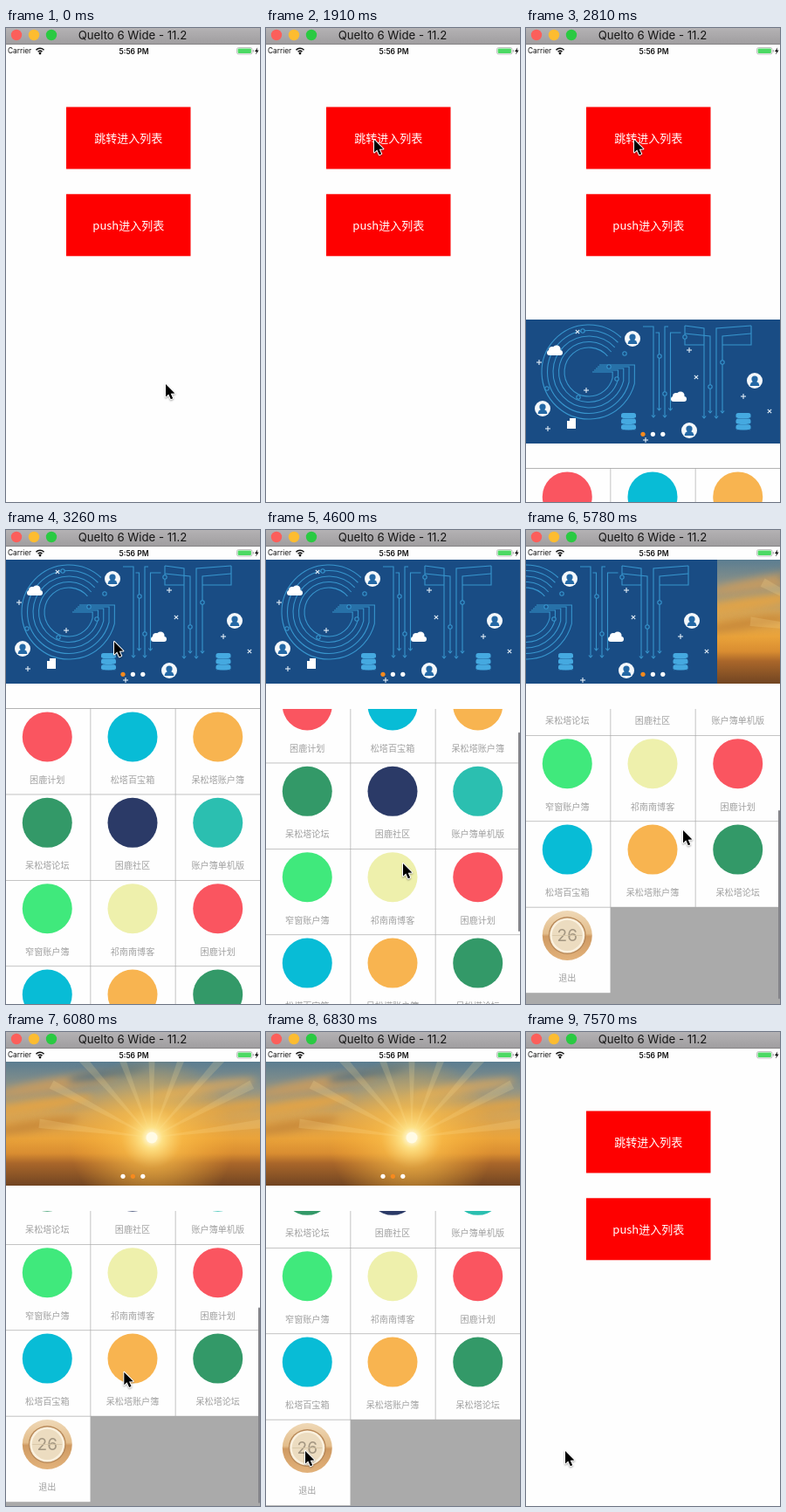
Animation of 291 by 543 pixels, one loop 8 s. Source, as an HTML page with a canvas:

```html
<!DOCTYPE html>
<html lang="zh">
<head>
<meta charset="utf-8">
<style>
html, body { margin: 0; width: 100%; height: 100%; overflow: hidden; background: #fefefe; }
canvas { display: block; width: 291px; height: 543px; }
</style>
</head>
<body>
<canvas id="stage"></canvas>
<script>
const W = 291, H = 543, LOOP = 8000, TICK = 148.4, TAU = Math.PI * 2;
const GRID_Y = 205, PITCH = 98.4, GAP = 0.7, CELL_W = (W - 2 * GAP) / 3;
const BANNER_Y = 34, BANNER_H = 142;
const CJK = '"Noto Sans CJK SC", "Noto Sans CJK", "Noto Sans", sans-serif';
const UI = 'Inter, Roboto, sans-serif';

const canvas = document.getElementById('stage');
const dpr = window.devicePixelRatio || 1;
canvas.width = W * dpr;
canvas.height = H * dpr;
const g = canvas.getContext('2d');

const apps = [
  ['困鹿计划', '#fa5560'], ['松塔百宝箱', '#08bcd6'], ['呆松塔账户簿', '#f8b450'],
  ['呆松塔论坛', '#339968'], ['困鹿社区', '#2b3a67'], ['账户簿单机版', '#2bbfb0'],
  ['窄窗账户簿', '#40e97c'], ['祁南南博客', '#eef0ac']
];
const cells = [0, 1, 2, 3, 4, 5, 6, 7, 0, 1, 2, 3].map(i => apps[i]).concat([['退出', null]]);

// Keys are [tick, value, ...], interpolated linearly.
const cursorKeys = [
  [0, 183, 408], [3, 203, 247], [4, 203, 247], [7, 241, 177], [8, 241, 177],
  [13, 124, 128], [24, 124, 128], [27, 157, 437], [30, 157, 437], [31, 157, 382],
  [32, 168, 355], [33, 180, 344], [39, 180, 344], [45, 46, 481], [46, 45, 480]
];
const scrollKeys = [
  [30, 0], [31, 36], [32, 74], [33, 98], [34, 116], [35, 131], [36, 143],
  [37, 153], [38, 161], [39, 166], [40, 162], [41, 158], [42, 155.5], [44, 154]
];
const sheetKeys = [[18, 521], [19, 300], [20, 95], [21, 18], [22, 0], [49, 0], [50, 310], [51, 521]];
const slideKeys = [[38, 0], [39, 72], [40, 240], [41, 291]];
const barKeys = [[30, 0], [31, 1], [41, 1], [44, 0]];

function at(keys, n) {
  let a = keys[0];
  for (const b of keys) {
    if (n <= b[0]) {
      const p = b === a ? 0 : (n - a[0]) / (b[0] - a[0]);
      return a.slice(1).map((v, i) => v + (b[i + 1] - v) * p);
    }
    a = b;
  }
  return a.slice(1);
}

function rect(x, y, w, h, color) {
  g.fillStyle = color;
  g.fillRect(x, y, w, h);
}

function disc(x, y, r, color) {
  g.fillStyle = color;
  g.beginPath();
  g.arc(x, y, r, 0, TAU);
  g.fill();
}

function pill(x, y, w, h, r, color) {
  g.fillStyle = color;
  g.beginPath();
  g.roundRect(x, y, w, h, r);
  g.fill();
}

function line(...pts) {
  g.beginPath();
  for (let i = 0; i < pts.length; i += 2) g.lineTo(pts[i], pts[i + 1]);
  g.stroke();
}

function text(str, x, y, font, color, align = 'center') {
  g.font = font;
  g.fillStyle = color;
  g.textAlign = align;
  g.textBaseline = 'middle';
  g.fillText(str, x, y);
}

function clipped(x, y, w, h, draw) {
  g.save();
  g.beginPath();
  g.rect(x, y, w, h);
  g.clip();
  draw();
  g.restore();
}

function titleBar() {
  const fill = g.createLinearGradient(0, 0, 0, 18);
  fill.addColorStop(0, '#b4b2b4');
  fill.addColorStop(1, '#a09ea0');
  rect(0, 0, W, 18, fill);
  rect(0, 18, W, 1, '#858385');
  ['#fc5f5b', '#fdbc30', '#2aca42'].forEach((c, i) => disc(12 + i * 20, 8, 6.2, c));
  text('Quelto 6 Wide - 11.2', 145, 9, '13.2px ' + UI, '#151515');
}

function statusBar() {
  text('Carrier', 2, 27, '8.3px ' + UI, '#111', 'left');
  text('5:56 PM', 146.5, 27, '600 8.5px ' + UI, '#111');
  g.strokeStyle = '#111';
  g.lineWidth = 1.5;
  for (const r of [3.3, 6.2]) {
    g.beginPath();
    g.arc(39, 29.5, r, -Math.PI * 0.76, -Math.PI * 0.24);
    g.stroke();
  }
  disc(39, 29, 1.4, '#111');
  g.strokeStyle = '#999';
  g.lineWidth = 0.6;
  g.beginPath();
  g.roundRect(264.5, 22.5, 17.5, 7.5, 2);
  g.stroke();
  pill(265.6, 23.6, 15.3, 5.3, 1, '#4cd964');
  pill(282.8, 25, 1, 2.6, 0.5, '#999');
  g.fillStyle = '#111';
  g.beginPath();
  [[288.2, 22.3], [285, 27], [287, 27], [286, 30.6], [289.6, 25.6], [287.5, 25.6]]
    .forEach(p => g.lineTo(...p));
  g.fill();
}

function home() {
  [['跳转进入列表', 90.5], ['push进入列表', 190.3]].forEach(([label, y]) => {
    rect(69, y, 142.5, 71, '#fe0000');
    text(label, 140.3, y + 35.7, '300 13px ' + CJK, '#fff');
  });
}

function avatar(x, y) {
  disc(x, y, 9, '#f4f8fb');
  disc(x, y - 2, 3.6, '#2468a5');
  g.beginPath();
  g.arc(x, y + 6, 5.4, Math.PI, 0);
  g.fill();
}

function cloud(x, y) {
  pill(x - 9, y, 18, 6, 3, '#fff');
  disc(x - 3, y, 4, '#fff');
  disc(x + 2, y - 1, 4.6, '#fff');
}

function database(x, y) {
  for (let i = 0; i < 3; i++) {
    pill(x - 8.5, y + i * 6.6, 17, 6.6, 2.6, '#45a9e0');
    g.strokeStyle = '#1a4c84';
    g.lineWidth = 0.9;
    g.beginPath();
    g.ellipse(x, y + 5 + i * 6.6, 8.5, 2, 0, 0, Math.PI);
    g.stroke();
  }
}

function arrow(x, y, dir) {
  line(x - 2.2, y - 2.5 * dir, x, y, x + 2.2, y - 2.5 * dir);
}

function circuitBanner() {
  rect(0, 0, W, H, '#194c84');
  g.strokeStyle = '#3795cd';
  g.lineWidth = 1.1;
  for (let i = 0; i < 5; i++) {
    const r = 54 - i * 6.5;
    g.beginPath();
    g.arc(72, 94, r, -0.82 + i * 0.03, 0.25, true);
    g.lineTo(72 + r * 0.97, 86 + i * 2);
    g.lineTo(84 - i * 2, 86 + i * 2);
    g.stroke();
  }
  // Stem of the I
  for (let i = 0; i < 4; i++) {
    const x = 146 + i * 6.5, y = 42 + (i % 2) * 7;
    line(x - 12 + i * 8, y, x, y, x, 146 - (i % 2) * 8);
    arrow(x, 146 - (i % 2) * 8, 1);
  }
  // T with a wide double bar
  for (let i = 0; i < 4; i++) {
    const x = 204 + i * 7, y = 41 + (i % 2) * 9;
    line(i < 2 ? 182 : 258, y, x, y + 3, x, 147 - (i % 2) * 6);
    arrow(x, 147 - (i % 2) * 6, 1);
  }
  line(182, 41, 182, 63, 204, 63);
  line(258, 41, 258, 63, 225, 63);
  [[65, 47], [24, 113], [95, 88], [104, 102], [60, 123], [113, 73], [153, 76], [159, 119], [211, 111], [225, 83], [182, 54]]
    .forEach(([x, y]) => {
      disc(x, y, 2.2, '#194c84');
      g.stroke();
    });
  [[122, 56], [19, 136], [262, 104], [187, 161]].forEach(p => avatar(...p));
  cloud(33, 69);
  cloud(175, 122);
  database(117.5, 141);
  database(249, 141);
  rect(47, 147, 10, 12, '#fff');
  rect(47, 147, 3, 3, '#194c84');
  g.strokeStyle = '#e4eff8';
  g.lineWidth = 1.1;
  [[69, 115], [15, 83], [25, 159], [137, 172], [249, 122], [187, 69]].forEach(([x, y]) => {
    line(x - 3, y, x + 3, y);
    line(x, y - 3, x, y + 3);
  });
  [[59, 48], [195, 100], [279, 139]].forEach(([x, y]) => {
    line(x - 2.2, y - 2.2, x + 2.2, y + 2.2);
    line(x - 2.2, y + 2.2, x + 2.2, y - 2.2);
  });
}

function sunsetBanner() {
  const sky = g.createLinearGradient(0, BANNER_Y, 0, BANNER_Y + BANNER_H);
  [[0, '#5b7d91'], [0.22, '#8f9488'], [0.42, '#d3a458'], [0.62, '#eaa33a'], [0.74, '#d98d31'], [0.82, '#a9662a'], [1, '#714522']]
    .forEach(s => sky.addColorStop(...s));
  rect(0, BANNER_Y, W, BANNER_H, sky);
  g.save();
  g.filter = 'blur(4px)';
  [[60, 60, 70, 8, '#c29a62'], [40, 84, 60, 7, '#e0a348'], [225, 65, 62, 7, '#c7a267'], [255, 88, 50, 6, '#dba24a'], [115, 48, 45, 5, '#537183'], [30, 108, 55, 6, '#c98a3a']]
    .forEach(([x, y, rx, ry, c]) => {
      g.fillStyle = c;
      g.beginPath();
      g.ellipse(x, y, rx, ry, -0.16, 0, TAU);
      g.fill();
    });
  g.restore();
  const glow = g.createRadialGradient(167, 121, 3, 167, 121, 95);
  [[0, '#fffbe0'], [0.1, '#ffe58aee'], [0.35, '#ffc24a99'], [1, '#ffb03000']]
    .forEach(s => glow.addColorStop(...s));
  rect(0, BANNER_Y, W, BANNER_H, glow);
  g.fillStyle = '#ffe39a30';
  for (let i = 0; i < 9; i++) {
    const a = Math.PI * (1.04 + i * 0.115);
    g.beginPath();
    for (const d of [-0.04, 0.04]) g.lineTo(167 + 130 * Math.cos(a + d), 121 + 130 * Math.sin(a + d));
    g.lineTo(167, 121);
    g.fill();
  }
  disc(167, 121, 6.5, '#fffbe6');
}

function banner(slide) {
  clipped(0, BANNER_Y, W, BANNER_H, () => {
    [circuitBanner, sunsetBanner].forEach((draw, i) => {
      const x = i * W - slide;
      if (Math.abs(x) >= W) return;
      g.save();
      g.translate(x, 0);
      clipped(0, BANNER_Y, W, BANNER_H, draw);
      g.restore();
    });
  });
  const page = Math.round(slide / W);
  for (let i = 0; i < 3; i++) disc(134 + i * 11.4, 165.3, 2.6, i === page ? '#f78a1d' : '#fff');
}

function exitIcon(x, y) {
  const wood = g.createLinearGradient(0, y - 28, 0, y + 28);
  [[0, '#efd8b6'], [0.46, '#e3bd8b'], [0.52, '#cf9a62'], [1, '#e2b27b']].forEach(s => wood.addColorStop(...s));
  disc(x, y, 28.5, wood);
  disc(x, y, 21.5, '#b98a5a');
  disc(x, y, 20, '#faf1df');
  disc(x, y, 17.5, '#ecdcc0');
  text('26', x, y + 1, '19px ' + UI, '#a39681');
  g.strokeStyle = '#d6c4a4';
  g.lineWidth = 0.8;
  line(x - 17, y, x + 17, y);
}

function grid(scroll, bar) {
  clipped(0, 204, W, H - 204, () => {
    rect(0, 204, W, H, '#aaa');
    cells.forEach(([label, color], i) => {
      const x = (i % 3) * (CELL_W + GAP);
      const y = GRID_Y - 0.1 + Math.floor(i / 3) * PITCH - scroll;
      const cx = x + CELL_W / 2 - 1 + (i % 3) * 0.5;
      rect(x, y, CELL_W, PITCH - GAP, '#fefefe');
      if (color) disc(cx, y + 32, 28.5, color);
      else exitIcon(cx, y + 32);
      text(label, cx, y + 81, '300 10.1px ' + CJK, '#a0a0a0');
    });
    const view = H - GRID_Y, total = PITCH * 5;
    const over = Math.max(0, scroll - (total - view));
    const size = view * view / total - over;
    const top = GRID_Y + Math.min(scroll * view / total, view - size);
    g.globalAlpha = bar;
    pill(289, top + 2, 2, size - 4, 1, '#85858a');
    g.globalAlpha = 1;
  });
  if (scroll > 1) rect(0, 203, W, 2, '#fefefe');
}

function sheet(n, drop) {
  g.save();
  g.translate(0, drop);
  rect(0, 19, W, H, '#fefefe');
  grid(at(scrollKeys, n)[0], at(barKeys, n)[0]);
  banner(at(slideKeys, n)[0]);
  g.restore();
}

function cursor(x, y) {
  g.save();
  g.translate(x, y);
  g.beginPath();
  [[0, 0], [0, 14.6], [3.3, 11.6], [5.8, 17.3], [8.2, 16.2], [5.7, 10.8], [10.4, 10.6]]
    .forEach(p => g.lineTo(...p));
  g.closePath();
  g.lineJoin = 'round';
  g.lineWidth = 2;
  g.strokeStyle = '#fff';
  g.shadowColor = 'rgba(0,0,0,.35)';
  g.shadowBlur = 2 * dpr;
  g.shadowOffsetY = dpr;
  g.stroke();
  g.shadowColor = 'transparent';
  g.fillStyle = '#000';
  g.fill();
  g.restore();
}

function draw(ms) {
  const n = Math.floor((ms % LOOP + 20) / TICK);
  g.setTransform(dpr, 0, 0, dpr, 0, 0);
  rect(0, 0, W, H, '#fefefe');
  home();
  const [drop] = at(sheetKeys, n);
  if (drop < 521) sheet(n, drop);
  statusBar();
  titleBar();
  cursor(...at(cursorKeys, n));
}

let start = null;
function loop(now) {
  if (start === null) start = now;
  draw(now - start);
  requestAnimationFrame(loop);
}
requestAnimationFrame(loop);
</script>
</body>
</html>
```
